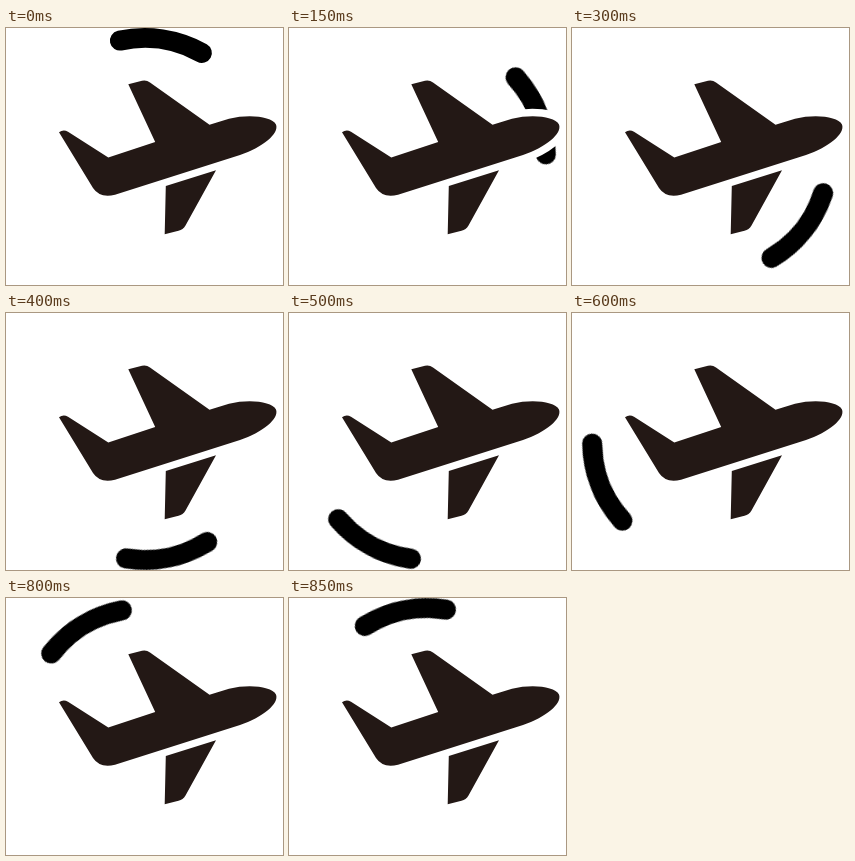
These frames come from a looping animation (277x257 px, 0.9 s). An HTML page:

```html
<!DOCTYPE html>
<html lang="en">
<head>
<meta charset="utf-8">
<title>Flight loader</title>
<style>
  html, body { margin: 0; width: 100%; height: 100%; overflow: hidden; background: #fff; }
  svg { display: block; width: 100%; height: 100%; }
  .arc {
    fill: none; stroke: #000; stroke-width: 20; stroke-linecap: round;
    transform-origin: 138.5px 128.5px;
    animation: orbit 900ms steps(18) infinite;
  }
  .plane { fill: #231815; }
  .halo { fill: #fff; stroke: #fff; stroke-width: 15; stroke-linejoin: round; }
  @keyframes orbit { to { transform: rotate(360deg); } }
</style>
</head>
<body>
<svg viewBox="0 0 277 257">
  <defs>
    <path id="body" d="M122.3 56.3 L136 52.7 Q140.5 51.6 144 54.6 L203.5 96.8 L223 90.8
      C243 85.8 266 88.5 270 96.5 C273.5 106 256 119.5 234 127
      L109 166.7 Q94 170.5 87 160 L53 104.2 Q57.5 101.2 62 103.8
      L102.3 129.6 L149.2 114 Z"/>
  </defs>
  <path class="arc" d="M113.9 12.6 A118.5 118.5 0 0 1 195.9 24.9"/>
  <use href="#body" class="halo"/>
  <g class="plane">
    <use href="#body"/>
    <path d="M159.8 158 L210 142.3 L179.5 197.5 Q177 201.8 172.5 202.8 L158.7 206.2 Z"/>
  </g>
</svg>
</body>
</html>
```
